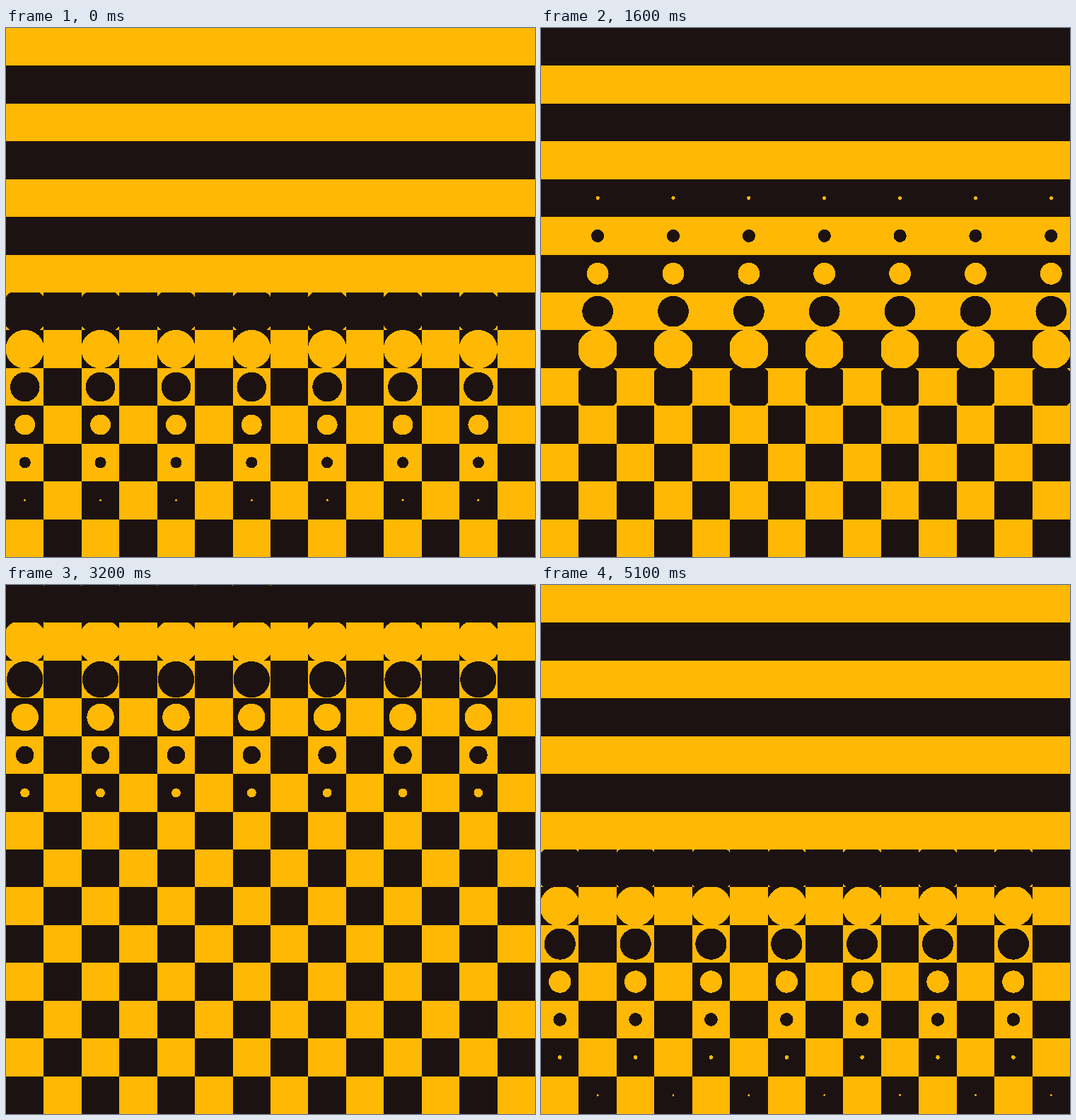
Write an HTML page with a canvas that moves like this. It is 748x748 px and loops after 5120 ms.

```html
<!DOCTYPE html>
<html lang="en">
<head>
<meta charset="utf-8">
<title>Checker waves</title>
<style>
  html, body { margin: 0; width: 100%; height: 100%; overflow: hidden; background: #1c1211; }
  canvas { display: block; width: 748px; height: 748px; }
</style>
</head>
<body>
<canvas id="stage" width="748" height="748"></canvas>
<script>
const ctx = document.getElementById("stage").getContext("2d");
const SIZE = 748, COUNT = 14, CELL = SIZE / COUNT;
const LOOP = 5120, HALF = LOOP / 2, STEP = 20;
const STAGGER = HALF / 25;
const SHRINK = 640;
const COLORS = ["#ffb803", "#1c1211"];

const edge = i => Math.round(i * CELL);

// Moment at which a cell's disc vanishes: even columns run upwards, odd ones downwards.
const endTime = (row, col) =>
  col % 2 ? HALF - (COUNT - 1 - row) * STAGGER
          : (COUNT - 1 - row) * STAGGER - 80;

// Hard-edged disc, clipped to its cell.
function disc(row, col, radius) {
  const cx = (col + 0.5) * CELL, cy = (row + 0.5) * CELL;
  const left = edge(col), right = edge(col + 1);
  const top = Math.max(edge(row), Math.floor(cy - radius));
  const bottom = Math.min(edge(row + 1), Math.ceil(cy + radius));
  for (let y = top; y < bottom; y++) {
    const dy = y + 0.5 - cy;
    const half = Math.sqrt(Math.max(0, radius * radius - dy * dy));
    const x0 = Math.max(left, Math.round(cx - half));
    const x1 = Math.min(right, Math.round(cx + half));
    if (x1 > x0) ctx.fillRect(x0, y, x1 - x0, 1);
  }
}

function drawCell(row, col, time) {
  const end = endTime(row, col);
  const flips = Math.ceil((time - end) / HALF);
  const left = flips * HALF + end - time;
  const radius = left > 0 ? 0.75 * CELL * left / SHRINK + 0.15 : 0;
  const old = Math.abs(row + flips) % 2;
  const full = radius >= CELL * Math.SQRT1_2;
  const x = edge(col), y = edge(row);

  ctx.fillStyle = COLORS[full ? old : 1 - old];
  ctx.fillRect(x, y, edge(col + 1) - x, edge(row + 1) - y);
  if (!full && radius > 0) {
    ctx.fillStyle = COLORS[old];
    disc(row, col, radius);
  }
}

function draw(time) {
  for (let row = 0; row < COUNT; row++)
    for (let col = 0; col < COUNT; col++) drawCell(row, col, time);
}

const start = performance.now();
function tick() {
  const time = Math.max(0, performance.now() - start) % LOOP;
  draw(Math.floor(time / STEP) * STEP);
  requestAnimationFrame(tick);
}
tick();
</script>
</body>
</html>
```
